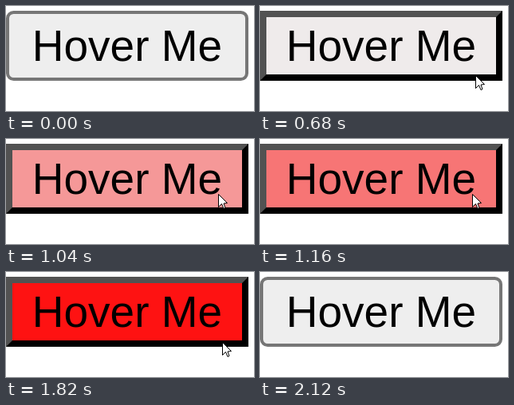
These frames come from a looping animation (311 by 132 pixels, 2480 ms). An HTML page with a canvas:

```html
<!DOCTYPE html>
<html lang="en">
<head>
<meta charset="utf-8">
<title>Hover Me</title>
<style>
  html, body { margin: 0; width: 100%; height: 100%; overflow: hidden; background: #fff; }
  canvas { display: block; }
</style>
</head>
<body>
<canvas id="stage" width="311" height="132"></canvas>
<script>
const ctx = document.getElementById('stage').getContext('2d');
const LOOP = 2480;
const BUTTON = { x: 0, y: 6, w: 304, h: 88 };
const BORDER = 8;
const ENTRY = [284, 125], EXIT = [285, 126], INSIDE = [266, 69];
const CURVE = [2.4, 1.84]; // sideways motion lags behind the vertical
const HOVER_START = 630, FADE = 1775;

const clamp = v => Math.min(1, Math.max(0, v));
const mix = (a, b, k) => a + (b - a) * k;

// CSS "ease": cubic-bezier(.25, .1, .25, 1)
function ease(x) {
  const bezier = (s, a, b) => 3 * (1 - s) ** 2 * s * a + 3 * (1 - s) * s * s * b + s ** 3;
  let lo = 0, hi = 1;
  for (let i = 0; i < 20; i++) {
    const mid = (lo + hi) / 2;
    if (bezier(mid, .25, .25) < x) lo = mid; else hi = mid;
  }
  return bezier(lo, .1, 1);
}

// The picture holds for 60 ms at a time once the pointer is moving
function quantize(t) {
  if (t < 480) return 0;
  if (t < 560) return 480;
  return 560 + 60 * Math.floor((t - 560) / 60);
}

function pointerAt(t) {
  if (t < 480 || t >= 2120) return null;
  const entering = t < 1520;
  const outside = entering ? ENTRY : EXIT;
  const away = entering ? 1 - clamp((t - 480) / 440) : clamp((t - 1520) / 540);
  return INSIDE.map((v, i) => Math.round(mix(v, outside[i], away ** CURVE[i])));
}

function polygon(points, color) {
  ctx.beginPath();
  points.forEach(p => ctx.lineTo(...p));
  ctx.closePath();
  ctx.fillStyle = color;
  ctx.fill();
}

function drawResting() {
  const { x, y, w, h } = BUTTON;
  ctx.beginPath();
  ctx.roundRect(x + 2, y + 2, w - 4, h - 4, 7.5);
  ctx.fillStyle = '#eee';
  ctx.fill();
  ctx.strokeStyle = '#767676';
  ctx.lineWidth = 4;
  ctx.stroke();
}

function drawHovered(k) {
  const { x, y, w, h } = BUTTON, b = BORDER;
  ctx.fillStyle = '#000';
  ctx.fillRect(x, y, w, h);
  polygon([[x, y], [x + w, y], [x + w - b, y + b], [x + b, y + b],
           [x + b, y + h - b], [x, y + h]], '#525252');
  const gb = Math.round(mix(239, 0, k));
  ctx.fillStyle = `rgb(${Math.round(mix(239, 255, k))},${gb},${gb})`;
  ctx.fillRect(x + b, y + b, w - 2 * b, h - 2 * b);
}

function drawPointer([x, y]) {
  ctx.save();
  ctx.translate(x + .5, y + .5);
  polygon([[0, 0], [0, 16], [4, 12], [6.5, 18], [8.5, 17], [6.5, 11.5], [11, 11]], '#fff');
  ctx.strokeStyle = '#000';
  ctx.lineWidth = 1;
  ctx.lineJoin = 'round';
  ctx.stroke();
  ctx.restore();
}

function draw(time) {
  const t = quantize(time % LOOP);
  const pointer = pointerAt(t);
  ctx.fillStyle = '#fff';
  ctx.fillRect(0, 0, 311, 132);

  const hovered = pointer && pointer[1] < BUTTON.y + BUTTON.h;
  if (hovered) drawHovered(ease(clamp((t - HOVER_START) / FADE)));
  else drawResting();

  ctx.fillStyle = '#000';
  ctx.font = '55px "Liberation Sans", Arial, sans-serif';
  ctx.textAlign = 'center';
  ctx.fillText('Hover Me', 152, 68.5);

  if (pointer) drawPointer(pointer);
}

const start = performance.now();
function tick() {
  draw(performance.now() - start);
  requestAnimationFrame(tick);
}
tick();
</script>
</body>
</html>
```
